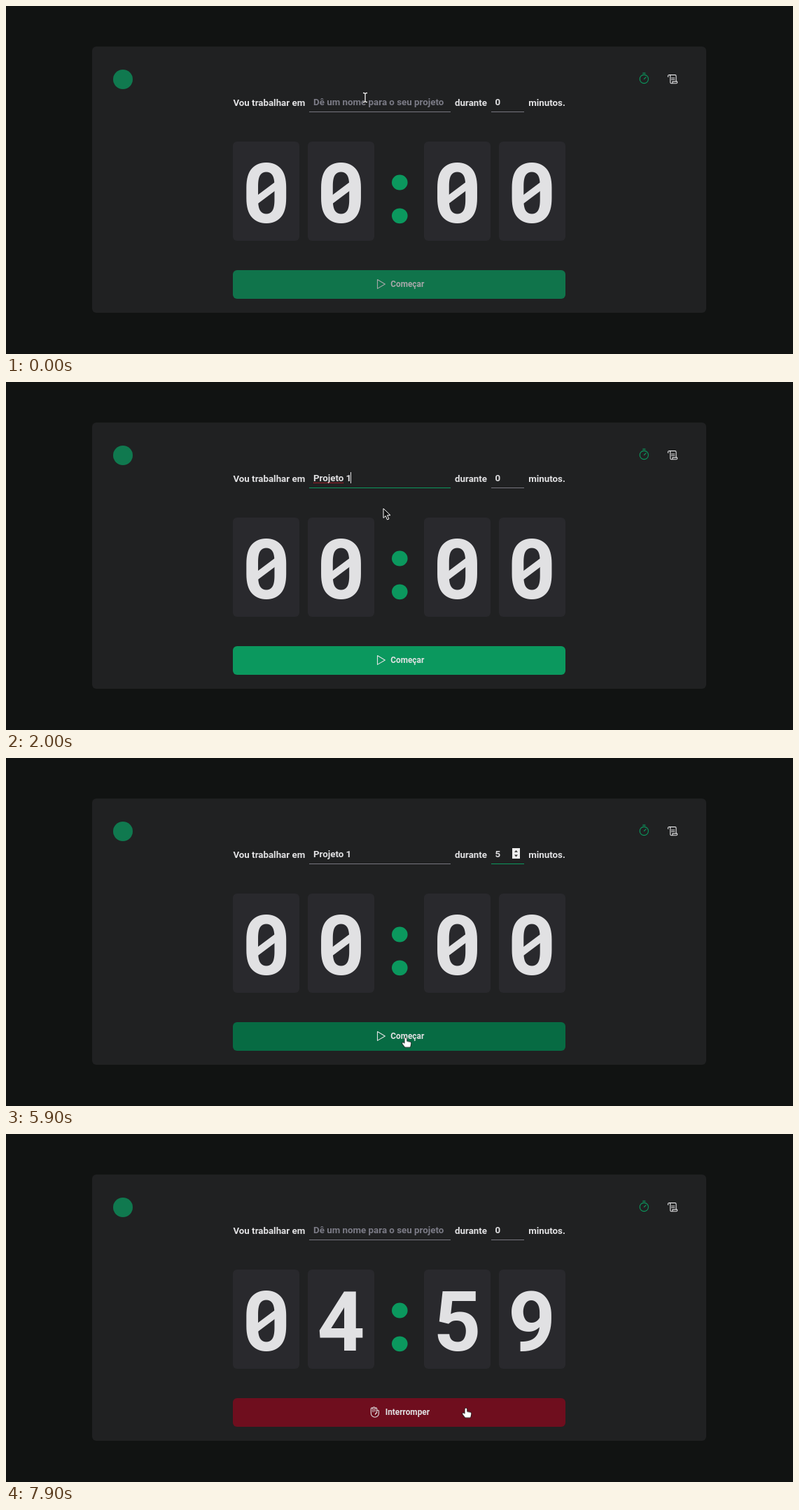
Animation, 1124 px wide and 498 px high, one loop 8 s. Source, as an HTML page:

```html
<!DOCTYPE html>
<html lang="pt-BR">
<head>
<meta charset="utf-8">
<title>Timer</title>
<style>
html, body { margin: 0; width: 100%; height: 100%; overflow: hidden; background: #111312; }
svg { display: block; width: 1124px; height: 498px; }
text { font: 700 13.34px Roboto, sans-serif; fill: #e1e1e3; white-space: pre; }
.digit text, text.digit { font-size: 118.5px; text-anchor: middle; }
text.label { font-size: 11.86px; }
.menu text { font: 400 12.8px "Noto Sans", sans-serif; fill: #fff; }
.icon { fill: none; stroke: #e1e1e3; stroke-width: 16; stroke-linecap: round; stroke-linejoin: round; }
.hint { fill: #7b7b86; }
.line { fill: #76767f; }
.focus { fill: #0b985e; }
.caret { fill: #e1e1e3; }

/* 1% of the loop is 80 ms; every change is hard */
[style*="--a"] { opacity: 0; animation: var(--a) 8s step-end -20ms infinite; }
.cursor { animation: move 8s step-end -20ms infinite; }

@keyframes blank    { 0% { opacity: 1 } 22.5% { opacity: 0 } 76.25% { opacity: 1 } }
@keyframes chosen   { 22.5% { opacity: 1 } 76.25% { opacity: 0 } }
@keyframes spell    { 22.5% { opacity: 1 } 46.25% { opacity: 0 } }
@keyframes name     { 10% { opacity: 1 } 46.25% { opacity: 0 } }
@keyframes minutes  { 46.25% { opacity: 1 } 75% { opacity: 0 } }
@keyframes nought   { 0% { opacity: 1 } 46.25% { opacity: 0 } 76.25% { opacity: 1 } }
@keyframes five     { 46.25% { opacity: 1 } 76.25% { opacity: 0 } }
@keyframes spinner  { 33.75% { opacity: 1 } 76.25% { opacity: 0 } }
@keyframes spinOver { 36.25% { opacity: 1 } 61.25% { opacity: 0 } }
@keyframes caretA   { 10% { opacity: 1 } 16.25% { opacity: 0 } }
@keyframes caretB   { 22.5% { opacity: 1 } 28.75% { opacity: 0 } 36.25% { opacity: 1 } 46.25% { opacity: 0 } }
@keyframes caretC   { 46.25% { opacity: 1 } 51.25% { opacity: 0 } 60% { opacity: 1 } 66.25% { opacity: 0 } }
@keyframes menu     { 10% { opacity: 1 } 22.5% { opacity: 0 } }
@keyframes menuOver { 16.25% { opacity: 1 } 22.5% { opacity: 0 } }
@keyframes start    { 0% { opacity: .7 } 22.5% { opacity: 1 } 66.25% { opacity: 0 } }
@keyframes hover    { 66.25% { opacity: 1 } 76.25% { opacity: 0 } }
@keyframes ring     { 75% { opacity: 1 } 76.25% { opacity: 0 } }
@keyframes stop     { 76.25% { opacity: 1 } }
@keyframes time0    { 0% { opacity: 1 } 76.25% { opacity: 0 } }
@keyframes time5    { 76.25% { opacity: 1 } 92.5% { opacity: 0 } }
@keyframes zeros    { 0% { opacity: 1 } 92.5% { opacity: 0 } }
@keyframes time459  { 92.5% { opacity: 1 } }
@keyframes beam     { 0% { opacity: 1 } 22.5% { opacity: 0 } 31.25% { opacity: 1 } 36.25% { opacity: 0 } }
@keyframes arrow    { 22.5% { opacity: 1 } 31.25% { opacity: 0 } 36.25% { opacity: 1 } 66.25% { opacity: 0 } }
@keyframes hand     { 66.25% { opacity: 1 } }
@keyframes move {
  0% { transform: translate(513px, 131px) }
  2.5% { transform: translate(513px, 134px) }
  3.75% { transform: translate(513px, 136.5px) }
  13.75% { transform: translate(517px, 143px) }
  15% { transform: translate(525px, 152px) }
  16.25% { transform: translate(532px, 162px) }
  17.5% { transform: translate(536px, 168px) }
  18.75% { transform: translate(537px, 170px) }
  21.25% { transform: translate(537.5px, 171.5px) }
  23.75% { transform: translate(538px, 176px) }
  25% { transform: translate(539px, 181px) }
  27.5% { transform: translate(548px, 180px) }
  28.75% { transform: translate(575px, 172px) }
  30% { transform: translate(615px, 160px) }
  31.25% { transform: translate(655px, 150px) }
  32.5% { transform: translate(695px, 142px) }
  33.75% { transform: translate(715px, 138px) }
  36.25% { transform: translate(721px, 135px) }
  37.5% { transform: translate(724px, 134px) }
  38.75% { transform: translate(726px, 133px) }
  40% { transform: translate(727px, 132px) }
  41.25% { transform: translate(727px, 130.5px) }
  60% { transform: translate(724px, 140px) }
  61.25% { transform: translate(712px, 175px) }
  62.5% { transform: translate(685px, 235px) }
  63.75% { transform: translate(635px, 310px) }
  65% { transform: translate(589px, 362.5px) }
  66.25% { transform: translate(577px, 390px) }
  67.5% { transform: translate(573px, 398px) }
  68.75% { transform: translate(571px, 400.5px) }
  76.25% { transform: translate(575px, 402px) }
  77.5% { transform: translate(592px, 405px) }
  78.75% { transform: translate(608px, 407px) }
  80% { transform: translate(616px, 407px) }
  85% { transform: translate(619px, 401px) }
  96.25% { transform: translate(690px, 403px) }
  97.5% { transform: translate(781px, 405px) }
  98.75% { transform: translate(657px, 392.5px) }
}
</style>
</head>
<body>
<svg viewBox="0 0 1124 498">
  <defs>
    <g id="zero" class="digit">
      <text y="309.6">0</text>
      <path d="M-13 271L13 251.5V264L-13 283.5Z" fill="#e1e1e3"/>
    </g>
    <rect id="board" y="194" width="95" height="142" rx="6" fill="#29292d"/>
    <rect id="bar" x="324" y="378" width="475" height="41" rx="6"/>
    <g id="startLabel">
      <path class="icon" d="M72 36V220L228 128Z" transform="translate(525.5 389.1) scale(.0695)"/>
      <text class="label" x="549.2" y="402">Começar</text>
    </g>
    <path id="beamShape" d="M-3 -6.5H-1.5L0 -5.5L1.5 -6.5H3M-3 6.5H-1.5L0 5.5L1.5 6.5H3M0 -5.5V5.5"/>
    <linearGradient id="menuFill" x2="0" y2="1">
      <stop stop-color="#484846"/><stop offset="1" stop-color="#3c3c3a"/>
    </linearGradient>
    <filter id="shadow" x="-20%" y="-20%" width="140%" height="140%">
      <feDropShadow dx="0" dy="2" stdDeviation="2" flood-opacity=".4"/>
    </filter>
  </defs>

  <rect x="123" y="58" width="877" height="381" rx="6" fill="#202122"/>
  <circle cx="167" cy="105" r="14" fill="#10794f"/>

  <g class="icon" transform="translate(902.4 95.6) scale(.0695)" style="stroke:#0b985e">
    <circle cx="128" cy="128" r="88"/>
    <path d="M128 128L167 89M104 8H152"/>
  </g>
  <g class="icon" transform="translate(943.2 95.8) scale(.0695)">
    <path d="M104 104H168M104 136H168M37 79A24 24 0 1 1 80 64V192A24 24 0 1 0 123 177H219A24 24 0 0 1 200 216H104M56 40H176A24 24 0 0 1 200 64V176"/>
  </g>

  <text x="324.4" y="143">Vou trabalhar em</text>
  <text x="641" y="143">durante</text>
  <text x="746.2" y="143">minutos.</text>

  <rect class="line" x="433" y="151" width="202" height="1"/>
  <rect class="line" x="693" y="151" width="47" height="1"/>
  <rect class="focus" style="--a:name" x="433" y="151" width="202" height="1"/>
  <rect class="focus" style="--a:minutes" x="693" y="151" width="47" height="1"/>

  <text class="hint" style="--a:blank" x="439" y="142">Dê um nome para o seu projeto</text>
  <text style="--a:chosen" x="439" y="142">Projeto 1</text>
  <path style="--a:spell" d="M439 144.3H482" stroke="#b5202c" stroke-width="1.2" stroke-dasharray="1.5 .7"/>
  <text style="--a:nought" x="698.6" y="142">0</text>
  <text style="--a:five" x="698.6" y="142">5</text>
  <g style="--a:spinner">
    <rect x="723" y="129" width="11" height="15" fill="#efefef"/>
    <rect style="--a:spinOver" x="723" y="129" width="11" height="7.5" fill="#c4c4c4"/>
    <path d="M726 134.8L728.5 132L731 134.8ZM726 138.6L728.5 141.4L731 138.6Z" fill="#333"/>
  </g>
  <rect class="caret" style="--a:caretA" x="439" y="129" width="1" height="16"/>
  <rect class="caret" style="--a:caretB" x="492" y="129" width="1" height="16"/>
  <rect class="caret" style="--a:caretC" x="706" y="129" width="1" height="16"/>

  <use href="#board" x="324"/>
  <use href="#board" x="431"/>
  <use href="#board" x="597"/>
  <use href="#board" x="704"/>
  <g fill="#0b985e">
    <ellipse cx="562.3" cy="252.5" rx="11.3" ry="10.9"/>
    <ellipse cx="562.3" cy="300.3" rx="11.3" ry="10.9"/>
  </g>

  <use href="#zero" x="371.8"/>
  <use href="#zero" x="478.5" style="--a:time0"/>
  <text class="digit" x="478.5" y="309.6" style="--a:time5">5</text>
  <g style="--a:zeros">
    <use href="#zero" x="644.4"/>
    <use href="#zero" x="751.1"/>
  </g>
  <g class="digit" style="--a:time459">
    <text x="478.5" y="309.6">4</text>
    <text x="644.4" y="309.6">5</text>
    <text x="751.1" y="309.6">9</text>
  </g>

  <rect style="--a:ring" x="322" y="376" width="479" height="45" rx="8" fill="#0b985e"/>
  <g style="--a:start">
    <use href="#bar" fill="#0b985e"/>
    <use href="#startLabel"/>
  </g>
  <g style="--a:hover">
    <use href="#bar" fill="#076b43"/>
    <use href="#startLabel"/>
  </g>
  <g style="--a:stop">
    <use href="#bar" fill="#6f0e1e"/>
    <path class="icon" transform="translate(518 389.1) scale(.0695)" d="M88 124V60A20 20 0 0 0 48 60V152A80 80 0 0 0 208 152V108A20 20 0 0 0 168 108V60A20 20 0 0 0 128 60V112M88 116V44A20 20 0 0 1 128 44V112M168 108V144A32 32 0 0 0 136 176"/>
    <text class="label" x="541.7" y="402">Interromper</text>
  </g>

  <g class="menu" style="--a:menu">
    <g filter="url(#shadow)">
      <path d="M524 161.5L532 154L540 161.5Z" fill="#484846"/>
      <rect x="515" y="161" width="88.5" height="95" rx="2" fill="url(#menuFill)"/>
    </g>
    <rect style="--a:menuOver" x="515" y="164" width="88.5" height="29.5" fill="#5a5a5a"/>
    <text x="524" y="183.5">Projeto 1</text>
    <text x="524" y="213.2">Projeto 2</text>
    <text x="524" y="243">Projeto 3</text>
  </g>

  <g class="cursor">
    <g style="--a:beam" fill="none">
      <use href="#beamShape" stroke="#111" stroke-width="2.8"/>
      <use href="#beamShape" stroke="#fff" stroke-width="1.3"/>
    </g>
    <path style="--a:arrow" d="M0 0V13.5L3.2 10.6L5.5 16L7.9 15L5.6 9.7H10Z" fill="#111" stroke="#fff"/>
    <path style="--a:hand" d="M-1.5 1.3a1.4 1.4 0 0 1 2.8 0V5l4.9 .9q1.4 .3 1.2 1.8l-.8 4.4q-.2 1.2-1.4 1.2h-5.4q-.9 0-1.5-.8l-3.2-4.2q-.5-.9 .4-1.3q.9-.3 3 1.1z" fill="#fff" stroke="#111" stroke-width="1.4" paint-order="stroke"/>
  </g>
</svg>
</body>
</html>
```
